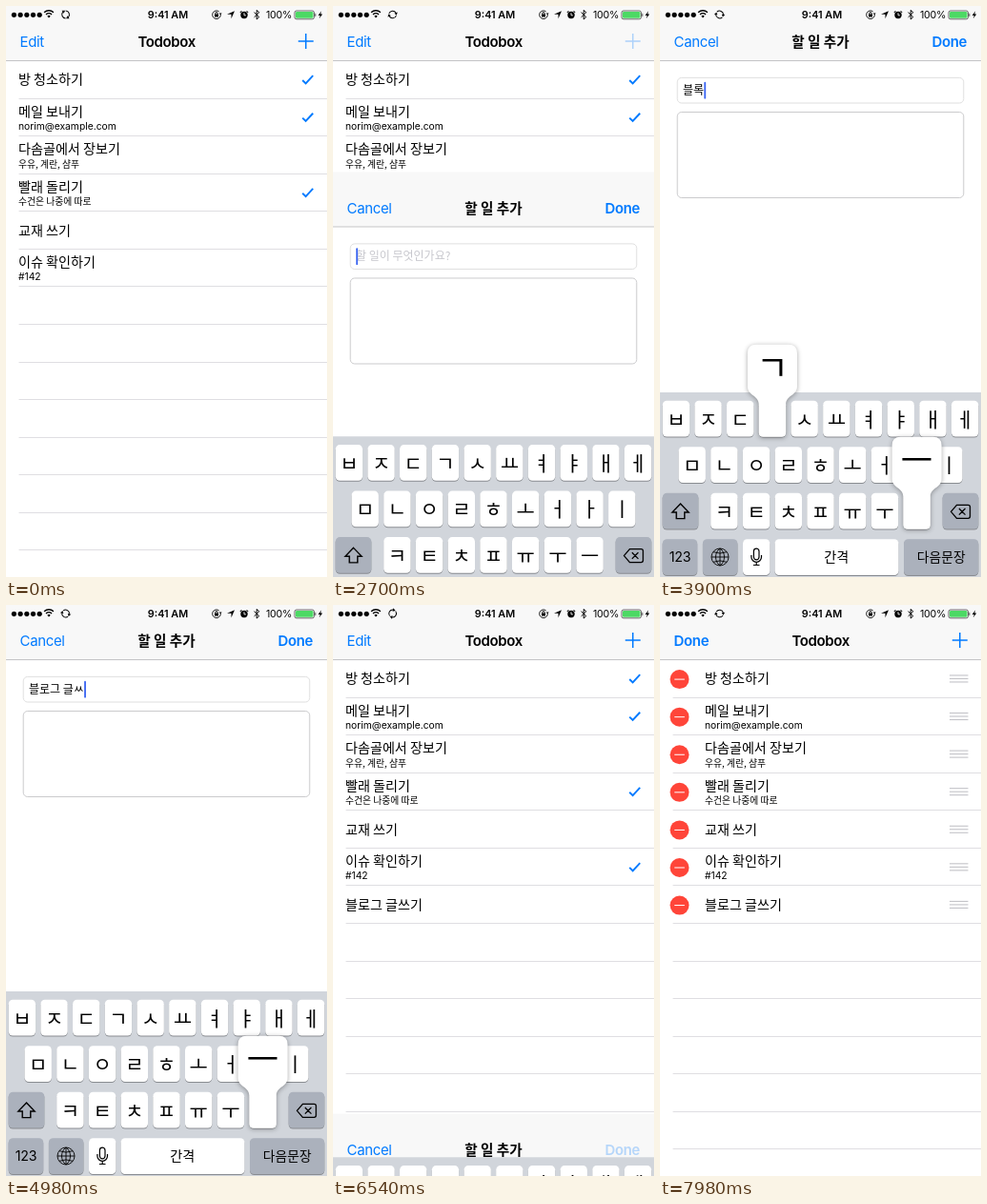
Recreate the animation shown at these times as an HTML page with a canvas. Size 337 by 600 pixels, loop 8 s.

```html
<!DOCTYPE html>
<html lang="ko">
<head>
<meta charset="utf-8">
<title>Todobox</title>
<style>
html, body { margin: 0; width: 100%; height: 100%; overflow: hidden; background: #fff; }
canvas { display: block; width: 100vw; height: 100vh; }
</style>
</head>
<body>
<canvas></canvas>
<script>
const W = 337, H = 600, LOOP = 8000;
const BLUE = '#007aff', BAR = '#f8f8f8', KEY_GREY = '#abb1bc';
const LATIN = 'Inter, sans-serif';
const KOREAN = '"Noto Sans CJK KR", "Noto Sans CJK JP", "Noto Sans CJK", sans-serif';
const ROW_TOP = 57.6, ROW_H = 39.58, KEYBOARD_TOP = 406, KEYBOARD_H = 194, POPUP_H = 97;

const canvas = document.querySelector('canvas');
const ctx = canvas.getContext('2d');
const dpr = window.devicePixelRatio || 1;
canvas.width = W * dpr;
canvas.height = H * dpr;

// Timeline in ms
const ROW_TAP = 1080, ROW_CHECK = 1200, PLUS_TAP = 2490, KEYBOARD_IN = 2550, MODAL_IN = 2565;
const DONE_TAP = 6210, KEYBOARD_OUT = 6329, MODAL_OUT = 6334, EDIT_TAP = 7530, EDIT_START = 7610;
const SHIFT_DOWN = 4630, SHIFT_END = 4890, HOLD = 105;

const todos = [
  { title: '방 청소하기', checked: true },
  { title: '메일 보내기', note: 'norim@example.com', checked: true },
  { title: '다솜골에서 장보기', note: '우유, 계란, 샴푸' },
  { title: '빨래 돌리기', note: '수건은 나중에 따로', checked: true },
  { title: '교재 쓰기' },
  { title: '이슈 확인하기', note: '#142', checkedAt: ROW_CHECK },
  { title: '블로그 글쓰기', addedAt: MODAL_OUT },
];

const strokes = [
  [3330, 'ㅂ', 'ㅂ'], [3430, 'ㅡ', '브'], [3530, 'ㄹ', '블'], [3645, 'ㄹ', '블ㄹ'],
  [3730, 'ㅗ', '블로'], [3805, 'ㄱ', '블록'], [3880, 'ㅡ', '블로그'], [4130, ' ', '블로그 '],
  [4260, 'ㄱ', '블로그 ㄱ'], [4370, 'ㅡ', '블로그 그'], [4480, 'ㄹ', '블로그 글'],
  [4780, 'ㅆ', '블로그 글ㅆ'], [4950, 'ㅡ', '블로그 글쓰'], [5080, 'ㄱ', '블로그 글쓱'],
  [5210, 'ㅣ', '블로그 글쓰기'],
].map(([down, key, text], i, all) => ({
  down, key, text,
  up: down + HOLD,
  commit: Math.min(down + HOLD, i + 1 < all.length ? all[i + 1][0] : Infinity),
}));

const clamp = v => Math.max(0, Math.min(1, v));
const progress = (t, start, length) => clamp((t - start) / length);
const easeInOut = p => p * p * (3 - 2 * p);
const between = (t, a, b) => t >= a && t < b;

// Critically damped spring used by system transitions
function spring(ms) {
  const x = Math.max(0, ms) / 1000 * Math.sqrt(1000 / 3);
  return x > 10 ? 1 : 1 - (1 + x) * Math.exp(-x);
}

function text(str, x, y, size, { font = KOREAN, weight = 400, color = '#000', align = 'left', spacing = 0 } = {}) {
  ctx.font = `${weight} ${size}px ${font}`;
  ctx.letterSpacing = spacing + 'px';
  ctx.fillStyle = color;
  ctx.textAlign = align;
  ctx.fillText(str, x, y);
}

function rect(x, y, w, h, color) {
  ctx.fillStyle = color;
  ctx.fillRect(x, y, w, h);
}

function roundRect(x, y, w, h, r, fill, stroke) {
  ctx.beginPath();
  ctx.roundRect(x, y, w, h, r);
  if (fill) { ctx.fillStyle = fill; ctx.fill(); }
  if (stroke) { ctx.strokeStyle = stroke; ctx.lineWidth = 0.9; ctx.stroke(); }
}

function circle(x, y, r, color) {
  ctx.beginPath();
  ctx.arc(x, y, r, 0, 7);
  ctx.fillStyle = color;
  ctx.fill();
}

function path(d, { x = 0, y = 0, fill, stroke = '#000', width = 1 }) {
  const shape = new Path2D(d);
  ctx.save();
  ctx.translate(x, y);
  if (fill) {
    ctx.fillStyle = fill;
    ctx.fill(shape);
  } else {
    ctx.strokeStyle = stroke;
    ctx.lineWidth = width;
    ctx.stroke(shape);
  }
  ctx.restore();
}

function faded(alpha, draw) {
  if (alpha <= 0) return;
  ctx.save();
  ctx.globalAlpha *= alpha;
  draw();
  ctx.restore();
}

function shifted(x, y, draw) {
  ctx.save();
  ctx.translate(x, y);
  draw();
  ctx.restore();
}

const navText = (str, x, options) =>
  text(str, x, 43.3, 15, { font: LATIN, spacing: -0.37, color: BLUE, ...options });

function navBar() {
  rect(0, 0, W, 57, BAR);
  rect(0, 57, W, 1, '#c4c4c6');
}

function statusBar(t) {
  for (let i = 0; i < 5; i++) circle(8.4 + i * 6.7, 9.3, 2.6, '#000');

  path('M-4.9 -1.4A6.9 6.9 0 0 1 4.9 -1.4M-3 .7A4.2 4.2 0 0 1 3 .7', { x: 45, y: 8.2, width: 1.4 });
  path('M-1.7 2.5A2.4 2.4 0 0 1 1.7 2.5L0 4.4Z', { x: 45, y: 8.2, fill: '#000' });

  ctx.save();
  ctx.translate(62.6, 9);
  ctx.rotate(Math.PI * (t / 1040 + 0.45));
  for (let i = 0; i < 2; i++) {
    path('M-3.9 -.6A4 4 0 0 1 3.2 -2.3', { width: 1 });
    path('M4.7 -3.3L4.2 .1L1.6 -1.6Z', { fill: '#000' });
    ctx.rotate(Math.PI);
  }
  ctx.restore();

  text('9:41 AM', 170, 13, 10.8, { font: LATIN, weight: 600, align: 'center' });

  path('M4.3 0A4.3 4.3 0 1 1 2.6 -3.4M-1.2 -.4V-1.4A1.2 1.2 0 0 1 1.2 -1.4V-.4', { x: 221, y: 9.2, width: 0.9 });
  path('M-2 -.6H2V2.2H-2ZM2.7 -1.8H5.6L4.2 .3Z', { x: 221, y: 9.2, fill: '#000' });
  path('M4 -4L.5 4V-.4H-4Z', { x: 236, y: 9.2, fill: '#000' });
  circle(250, 9.5, 3.7, '#000');
  path('M-4.1 -2.6A5 5 0 0 1 -2.5 -4.1M4.1 -2.6A5 5 0 0 0 2.5 -4.1', { x: 250, y: 9.5, width: 1.1 });
  path('M0 -2.2V.4H1.9', { x: 250, y: 9.4, stroke: '#fff', width: 0.9 });
  path('M-2.6 -2.6L2.6 2.4L0 4.8V-4.8L2.6 -2.4L-2.6 2.6', { x: 263.2, y: 9.2, width: 1 });

  text('100%', 273, 13, 10.6, { font: LATIN, spacing: -0.2 });
  roundRect(303, 5, 20.5, 8.8, 2, '#fff', '#555');
  roundRect(304, 6, 18.5, 6.8, 1.2, '#4cd964');
  rect(324.3, 7.8, 1, 3.2, '#555');
  path('M1.2 -4L-2.3 .6H-.2L-1.2 4L2.3 -.8H.2Z', { x: 330, y: 9.3, fill: '#000' });
}

function todoRow(todo, i, t, editing) {
  const top = ROW_TOP + ROW_H * i, mid = top + ROW_H / 2;
  const x = 13 + 34 * editing;
  const checked = todo.checked || t >= todo.checkedAt;

  if (todo.checkedAt && t >= ROW_TAP) {
    faded(1 - progress(t, ROW_CHECK + 30, 240), () => rect(0, top - 0.5, W, ROW_H, '#d9d9d9'));
  }
  text(todo.title, x, todo.note ? mid - 1.2 : mid + 4.9, 14.1);
  if (todo.note) {
    const latin = todo.note.charCodeAt(0) < 128;
    text(todo.note, x, mid + 13, latin ? 10.3 : 9.8, { font: latin ? LATIN : KOREAN });
  }
  if (checked) {
    faded(1 - editing, () => path('M-5.2 .6L-1.8 4L5.8 -4.2', { x: 316.5, y: mid, stroke: BLUE, width: 1.9 }));
  }
  faded(editing, () => {
    const cx = 20.5 - 34 * (1 - editing);
    circle(cx, mid + 0.7, 10, '#ff4539');
    rect(cx - 5.3, mid + 0.2, 10.6, 1, '#fff');
    for (let k = -1; k <= 1; k++) {
      rect(304 + 34 * (1 - editing), mid + k * 3.5 - 0.5, 19.5, 1.1, '#c3c3c8');
    }
  });
}

function todoList(t) {
  const editing = easeInOut(progress(t, EDIT_START, 300));
  rect(0, 0, W, H, '#fff');
  for (let k = 1; k <= 13; k++) rect(13.5, Math.floor(ROW_TOP + ROW_H * k - 0.15), W, 1, '#dfdee2');
  todos.forEach((todo, i) => {
    if (!(t < todo.addedAt)) todoRow(todo, i, t, editing);
  });

  navBar();
  navText('Todobox', 168.7, { weight: 600, color: '#000', align: 'center' });
  const pressed = t >= EDIT_TAP ? 0.3 : 1;
  faded((1 - editing) * pressed, () => navText('Edit', 14.6));
  faded(editing, () => navText('Done', 14.6, { weight: 600 }));
  faded(between(t, PLUS_TAP, MODAL_IN + 200) ? 0.3 : 1, () =>
    path('M-8 0H8M0 -8V8', { x: 314.8, y: 37, stroke: BLUE, width: 1.5 }));
}

function modal(t) {
  rect(0, 0, W, H, '#fff');
  navBar();
  navText('Cancel', 14.6);
  text('할 일 추가', 168.5, 43.2, 14.6, { weight: 600, align: 'center' });
  faded(t >= DONE_TAP ? 0.27 : 1, () => navText('Done', 322, { weight: 600, align: 'right' }));

  roundRect(18.2, 75.4, 300.6, 26.6, 4.5, '#fff', '#dcdcdc');
  roundRect(18.2, 111.5, 300.6, 90, 4.5, '#fff', '#c6c6c8');

  const typed = strokes.filter(s => t >= s.commit).pop();
  const value = typed ? typed.text : '';
  if (value) text(value, 24, 92.8, 12);
  else text('할 일이 무엇인가요?', 24, 92.8, 12, { color: '#c7c7cd' });

  const idle = t - (typed ? typed.commit : MODAL_IN);
  if (t < DONE_TAP && idle % 1000 < 550) {
    ctx.font = `400 12px ${KOREAN}`;
    ctx.letterSpacing = '0px';
    roundRect(24.2 + ctx.measureText(value).width, 79.8, 1.9, 17.8, 0.9, '#426bf2');
  }
}

const layout = [[16.85, 'ㅂㅈㄷㄱㅅㅛㅕㅑㅐㅔ'], [33.7, 'ㅁㄴㅇㄹㅎㅗㅓㅏㅣ'], [67.4, 'ㅋㅌㅊㅍㅠㅜㅡ']];
const shiftedJamo = { ㅂ: 'ㅃ', ㅈ: 'ㅉ', ㄷ: 'ㄸ', ㄱ: 'ㄲ', ㅅ: 'ㅆ', ㅐ: 'ㅒ', ㅔ: 'ㅖ' };
const keyTop = row => KEYBOARD_TOP + 8.8 + row * 48.5;

function keycap(x, row, w, color = '#fff') {
  const y = keyTop(row);
  roundRect(x, y + 1, w, 37.8, 4.5, '#898c91');
  roundRect(x, y, w, 37.8, 4.5, color);
}

function popup(cx, row, label) {
  const bottom = keyTop(row) + 38, top = bottom - POPUP_H;
  const left = Math.max(2, cx - 26), right = left + 52;
  const kl = cx - 14.2, kr = cx + 14.2, neck = top + 44, key = top + 63;
  const shape = new Path2D(
    `M${left + 9} ${top}H${right - 9}Q${right} ${top} ${right} ${top + 9}V${neck}` +
    `C${right} ${neck + 10} ${kr} ${key - 10} ${kr} ${key}V${bottom - 4.5}Q${kr} ${bottom} ${kr - 4.5} ${bottom}` +
    `H${kl + 4.5}Q${kl} ${bottom} ${kl} ${bottom - 4.5}V${key}` +
    `C${kl} ${key - 10} ${left} ${neck + 10} ${left} ${neck}V${top + 9}Q${left} ${top} ${left + 9} ${top}Z`);
  ctx.save();
  ctx.shadowColor = 'rgba(0,0,0,.35)';
  ctx.shadowBlur = 5 * dpr;
  ctx.shadowOffsetY = dpr;
  ctx.fillStyle = '#fff';
  ctx.fill(shape);
  ctx.restore();
  text(label, (left + right) / 2, top + 38, 37, { weight: 300, align: 'center' });
}

function keyboard(t) {
  const shiftOn = between(t, SHIFT_DOWN, SHIFT_END);
  const pressed = strokes.filter(s => between(t, s.down, s.up)).map(s => s.key);
  const popups = [];
  rect(0, KEYBOARD_TOP, W, KEYBOARD_H + 1, '#d1d5db');

  layout.forEach(([start, jamo], row) => [...jamo].forEach((base, i) => {
    const label = shiftOn && shiftedJamo[base] || base;
    const cx = start + i * 33.7;
    keycap(cx - 14.2, row, 28.4);
    text(label, cx, keyTop(row) + 26.7, 21, { align: 'center' });
    if (pressed.includes(label)) popups.push([cx, row, label]);
  }));

  keycap(2.7, 2, 37.6, shiftOn ? '#fff' : KEY_GREY);
  path('M0 -8.3L8.6 .6H4.3V7.2H-4.3V.6H-8.6Z',
    { x: 21.5, y: 531.4, width: 1.4, fill: shiftOn ? '#000' : '' });
  keycap(296.7, 2, 37.6, KEY_GREY);
  path('M-10 0L-4 -7H8Q10 -7 10 -5V5Q10 7 8 7H-4ZM-1.6 -3.3L5 3.3M5 -3.3L-1.6 3.3', { x: 315.5, y: 531.3, width: 1.3 });

  keycap(2.7, 3, 36.5, KEY_GREY);
  text('123', 21, 584, 14.2, { font: LATIN, align: 'center', spacing: -0.2 });
  keycap(44.9, 3, 36.5, KEY_GREY);
  path('M-9 0A9 9 0 1 1 9 0A9 9 0 1 1 -9 0M-9 0H9M0 -9V9M0 -9C-6 -5 -6 5 0 9C6 5 6 -5 0 -9' +
    'M-7 -5.3Q0 -2.5 7 -5.3M-7 5.3Q0 2.5 7 5.3', { x: 63, y: 579, width: 0.9 });
  keycap(87, 3, 28.4);
  path('M-2.8 -6A2.8 2.8 0 0 1 2.8 -6V0A2.8 2.8 0 0 1 -2.8 0ZM-5.3 -2V0A5.3 5.3 0 0 0 5.3 0V-2M0 5.3V8.5M-3.3 8.5H3.3',
    { x: 101.2, y: 579, width: 1.2 });
  keycap(120.5, 3, 130, pressed.includes(' ') ? KEY_GREY : '#fff');
  text('간격', 185.3, 583.5, 14.1, { align: 'center' });
  keycap(256, 3, 78.3, KEY_GREY);
  text('다음문장', 295.2, 583.5, 13.8, { align: 'center' });

  popups.forEach(args => popup(...args));
}

function render(t) {
  ctx.setTransform(dpr, 0, 0, dpr, 0, 0);
  todoList(t);
  const modalHidden = 1 - spring(t - MODAL_IN) + spring(t - MODAL_OUT);
  const keyboardHidden = 1 - spring(t - KEYBOARD_IN) + spring(t - KEYBOARD_OUT);
  if (modalHidden < 1) shifted(0, H * modalHidden, () => modal(t));
  if (keyboardHidden < 1) shifted(0, KEYBOARD_H * keyboardHidden, () => keyboard(t));
  statusBar(t);
}

const startTime = performance.now();
function tick() {
  render((performance.now() - startTime) % LOOP);
  requestAnimationFrame(tick);
}
tick();
</script>
</body>
</html>
```
